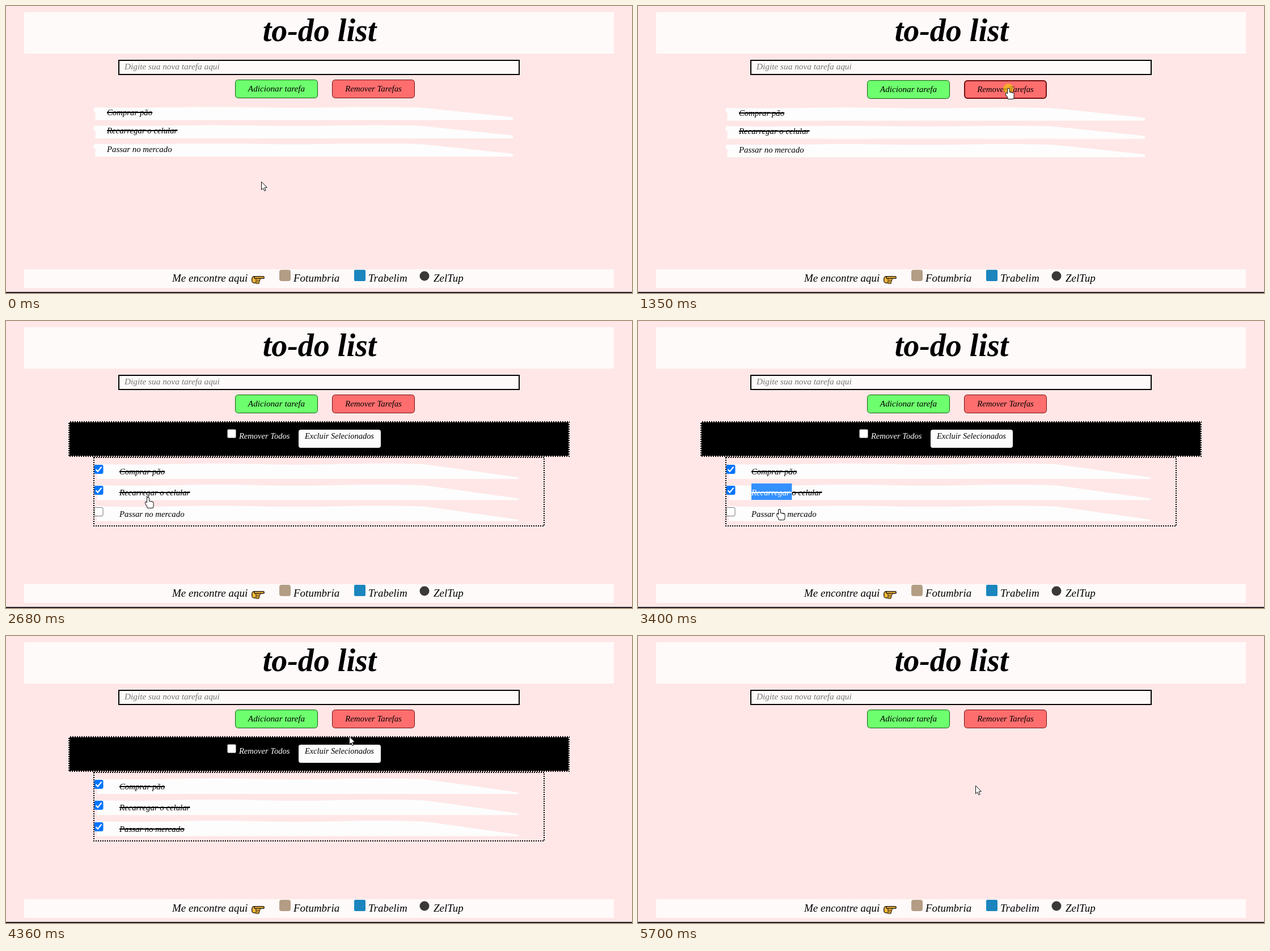
An HTML page with a canvas for the animation above (5.77 s loop, 1104 px wide and 507 px high).

```html
<!DOCTYPE html>
<html lang="pt-BR">
<head>
<meta charset="utf-8">
<title>to-do list</title>
<style>
  html, body { margin: 0; width: 100%; height: 100%; overflow: hidden; background: #ffe7e7; }
  canvas { display: block; width: 1104px; height: 507px; }
</style>
</head>
<body>
<canvas id="stage" width="1104" height="507"></canvas>
<script>
const ctx = document.getElementById('stage').getContext('2d');
const LOOP = 5770, STEP = 75;
const OPEN = 1450, CLEARED = 5050;
const TASKS = ['Comprar pão', 'Recarregar o celular', 'Passar no mercado'];
const PINK = '#ffe7e7', SNOW = '#fffafa', PAPER = '#fdfdfd';
const FONT = '"Liberation Serif", "Noto Serif", serif';

// The pointer eases from stop to stop; `via` bends the way there.
const REST = { x: 450, y: 310 };
const MOVES = [
  { start: 70, end: 620, x: 652, y: 212 },
  { start: 700, end: 1100, x: 653, y: 146 },
  { start: 1680, end: 2210, x: 268, y: 319, via: { x: 471, y: 141 } },
  { start: 2290, end: 2850, x: 249, y: 311 },
  { start: 3070, end: 3400, x: 249, y: 333 },
  { start: 3810, end: 4360, x: 605, y: 177 },
  { start: 4430, end: 4504, x: 606, y: 156 },
  { start: 4578, end: 4800, x: 604, y: 205 },
  { start: 5450, end: 5700, x: 595, y: 264 }
];
const REMOVE_CLICK = [1350, OPEN];
const RECHARGE_CLICK = [2920, 3070];
const MARKET_CLICK = [3560, 3660];
const DELETE_CLICK = [4970, CLEARED];
const CLICKS = [REMOVE_CLICK, RECHARGE_CLICK, MARKET_CLICK, DELETE_CLICK];

const ARROW = new Path2D('M0 0V14.2L3.2 11.2 5.4 16.2 7.6 15.2 5.5 10.4 9.8 10Z');

const within = (t, [a, b]) => t >= a && t < b;
const inside = (p, x, y, w, h) => p.x >= x && p.x <= x + w && p.y >= y && p.y <= y + h;
const easeOut = p => 1 - (1 - p) ** 2;
const bend = (a, b, c, s) => a * (1 - s) ** 2 + 2 * b * s * (1 - s) + c * s * s;

function pointerAt(t) {
  let from = REST, pos = REST;
  for (const move of MOVES) {
    if (t < move.start) break;
    const steps = Math.round((move.end - move.start) / STEP) + 1;
    const step = Math.floor((t - move.start) / (move.end - move.start) * (steps - 1) + .3);
    const s = easeOut(Math.min(1, (step + 1) / steps));
    const via = move.via || { x: (from.x + move.x) / 2, y: (from.y + move.y) / 2 };
    pos = { x: bend(from.x, via.x, move.x, s), y: bend(from.y, via.y, move.y, s) };
    from = move;
  }
  return pos;
}

function rect(x, y, w, h, fill) {
  ctx.fillStyle = fill;
  ctx.fillRect(x, y, w, h);
}

function box(x, y, w, h, r, fill, stroke, line = 0) {
  ctx.beginPath();
  ctx.roundRect(x + line / 2, y + line / 2, w - line, h - line, r);
  ctx.fillStyle = fill;
  ctx.fill();
  if (!line) return;
  ctx.strokeStyle = stroke;
  ctx.lineWidth = line;
  ctx.stroke();
}

function disc(x, y, r, fill) {
  ctx.beginPath();
  ctx.arc(x, y, r, 0, Math.PI * 2);
  ctx.fillStyle = fill;
  ctx.fill();
}

function dotted(x, y, w, h, color) {
  ctx.setLineDash([2, 2]);
  ctx.strokeStyle = color;
  ctx.lineWidth = 2;
  ctx.strokeRect(x + 1, y + 1, w - 2, h - 2);
  ctx.setLineDash([]);
}

function clipped(x, y, w, h, paint) {
  ctx.save();
  ctx.beginPath();
  ctx.rect(x, y, w, h);
  ctx.clip();
  paint();
  ctx.restore();
}

function text(str, x, y, size, color = '#000', align = 'left', weight = 'normal') {
  ctx.font = `italic ${weight} ${size}px ${FONT}`;
  ctx.textAlign = align;
  ctx.fillStyle = color;
  ctx.fillText(str, x, y);
}

// Strip of paint: rough left end, wavy top, stepped taper to the right.
function brush(x, y, h, sx, sy) {
  clipped(x, y, 800, h, () => {
    ctx.translate(x, y);
    ctx.scale(sx, sy);
    ctx.beginPath();
    ctx.moveTo(3, 25);
    ctx.lineTo(4, 12);
    ctx.lineTo(0, 8);
    for (let px = 2; px <= 740; px += 9) {
      const taper = Math.max(0, px / 740 - .77) / .23;
      const wave = 2 + Math.sin(px / 45) * .7;
      ctx.lineTo(px, wave + 18 * taper ** 1.2);
    }
    ctx.lineTo(740, 25);
    ctx.fillStyle = PAPER;
    ctx.fill();
  });
}

function checkbox(x, y, on) {
  box(x, y, 16, 16, 2, on ? '#0075ff' : '#fff', on ? '#0075ff' : '#767676', 1);
  if (!on) return;
  ctx.beginPath();
  ctx.moveTo(x + 3, y + 8.2);
  ctx.lineTo(x + 6.4, y + 11.8);
  ctx.lineTo(x + 13, y + 3.6);
  ctx.strokeStyle = '#fff';
  ctx.lineWidth = 2.2;
  ctx.stroke();
}

function task(str, x, y, done, color = '#000') {
  text(str, x, y, 14.8, color);
  if (done) rect(x, y - 6, ctx.measureText(str).width, 2, color);
}

function selection(str, part, x, y, done) {
  const w = ctx.measureText(part).width;
  rect(x, y - 21, w, 29, '#3390ff');
  clipped(x, y - 21, w, 29, () => task(str, x, y, done, '#fff'));
}

function pointingHand(x, y) {
  box(x, y + 4, 12, 13, 4, '#fcbc3a', '#2b2118', 1.5);
  box(x + 4, y + 4, 19, 5, 2.5, '#fcbc3a', '#2b2118', 1.5);
  for (let i = 0; i < 3; i++) {
    box(x + 7, y + 8 + i * 3, 9 - i, 4, 2, '#fcbc3a', '#2b2118', 1);
  }
}

function page() {
  rect(0, 0, 1104, 507, PINK);
  rect(32, 11, 1040, 73, SNOW);
  text('to-do list', 553, 62, 56, '#000', 'center', 'bold');
  box(198, 95, 708, 27, 0, SNOW, '#000', 2);
  text('Digite sua nova tarefa aqui', 209, 112, 15.3, '#757575');

  rect(32, 465, 1040, 33, SNOW);
  text('Me encontre aqui', 293, 487, 19);
  pointingHand(433, 473);
  box(482, 466, 20, 20, 4, '#b39d84');
  text('Fotumbria', 507, 487, 19);
  box(614, 466, 20, 20, 2, '#1b86bd');
  text('Trabelim', 639, 487, 19);
  disc(738, 477, 8.5, '#3b3838');
  text('ZelTup', 754, 487, 19);
  rect(0, 505, 1104, 2, '#242124');
}

function buttons(dy) {
  box(404, 130 + dy, 146, 33, 5, '#6eff6e', '#0f600f', 1);
  text('Adicionar tarefa', 477, 151 + dy, 15.2, '#000', 'center');
  box(575, 130 + dy, 146, 33, 5, '#ff6e6e', '#740c0c', 1 + dy);
  text('Remover Tarefas', 648, 151 + dy, 14.8, '#000', 'center');
}

function simpleList(dy) {
  TASKS.forEach((str, i) => {
    const y = 177 + dy + i * 32.3;
    brush(154, y, 24.5, 1, 1);
    task(str, 178, Math.round(y + 16), i < 2);
  });
}

function panel(t, dy, up) {
  rect(110, 177 + dy, 884, 63 - up, '#000');
  dotted(110, 177 + dy, 884, 63 - up, PINK);
  checkbox(390, 191 + dy, false);
  text('Remover Todos', 411, 208 + dy, 14.5, '#fff');
  box(516, 192 + dy, 145, 32, 4, PAPER);
  if (up) dotted(516, 192 + dy, 145, 32, '#000');
  text('Excluir Selecionados', 588, 208 + dy + up, 14.4, '#000', 'center');

  const shift = dy - up;
  const checked = [true, !within(t, RECHARGE_CLICK), t >= MARKET_CLICK[0]];
  const selected = within(t, [RECHARGE_CLICK[1], MARKET_CLICK[0]]);
  TASKS.forEach((str, i) => {
    const y = 250 + shift + i * 37.3;
    const base = Math.round(y + 21);
    brush(157, y, 29, 1.01, 1.36);
    checkbox(155.5, Math.round(y + 4), checked[i]);
    task(str, 200, base, checked[i]);
    if (selected && i === 1) selection(str, 'Recarregar ', 200, base, checked[i]);
  });
  dotted(154, 240 + shift, 796, 123, '#000');
}

function overLabel(pos) {
  ctx.font = `italic 14.8px ${FONT}`;
  return TASKS.some((str, i) =>
    inside(pos, 200, 250 + i * 37.3, ctx.measureText(str).width, 29));
}

function hand() {
  ctx.beginPath();
  ctx.ellipse(-2, 11, 1.6, 4, -.6, 0, Math.PI * 2);
  ctx.roundRect(-1.5, 8, 10.5, 9.5, 2.5);
  ctx.roundRect(-1.5, -.5, 3, 14, 1.5);
  for (let i = 1; i <= 3; i++) ctx.roundRect(-1.5 + i * 2.6, 5.2 + i * .7, 2.8, 6, 1.4);
  ctx.stroke();
  ctx.fill();
}

function cursor({ x, y }, isHand, click) {
  if (click) disc(x, y, 9, 'rgba(240,205,10,.65)');
  ctx.save();
  ctx.translate(Math.round(x) + .5, Math.round(y) + .5);
  ctx.fillStyle = '#fff';
  ctx.strokeStyle = '#111';
  ctx.lineJoin = 'round';
  ctx.lineWidth = isHand ? 2 : 1;
  if (isHand) {
    hand();
  } else {
    ctx.fill(ARROW);
    ctx.stroke(ARROW);
  }
  ctx.restore();
}

function draw(now) {
  const t = now % LOOP;
  const open = within(t, [OPEN, CLEARED]);
  const pos = pointerAt(t);
  const onRemove = inside(pos, 575, 130, 146, 33);
  const onDelete = open && inside(pos, 516, 192, 145, 32);
  const dy = Number(onRemove);

  page();
  buttons(dy);
  if (open) panel(t, dy, Number(onDelete));
  else if (t < OPEN) simpleList(dy);
  const isHand = onRemove || onDelete || (open && overLabel(pos));
  cursor(pos, isHand, CLICKS.some(c => within(t, c)));
}

let origin;
function tick(now) {
  origin ??= now;
  draw(now - origin);
  requestAnimationFrame(tick);
}
draw(0);
requestAnimationFrame(tick);
</script>
</body>
</html>
```
